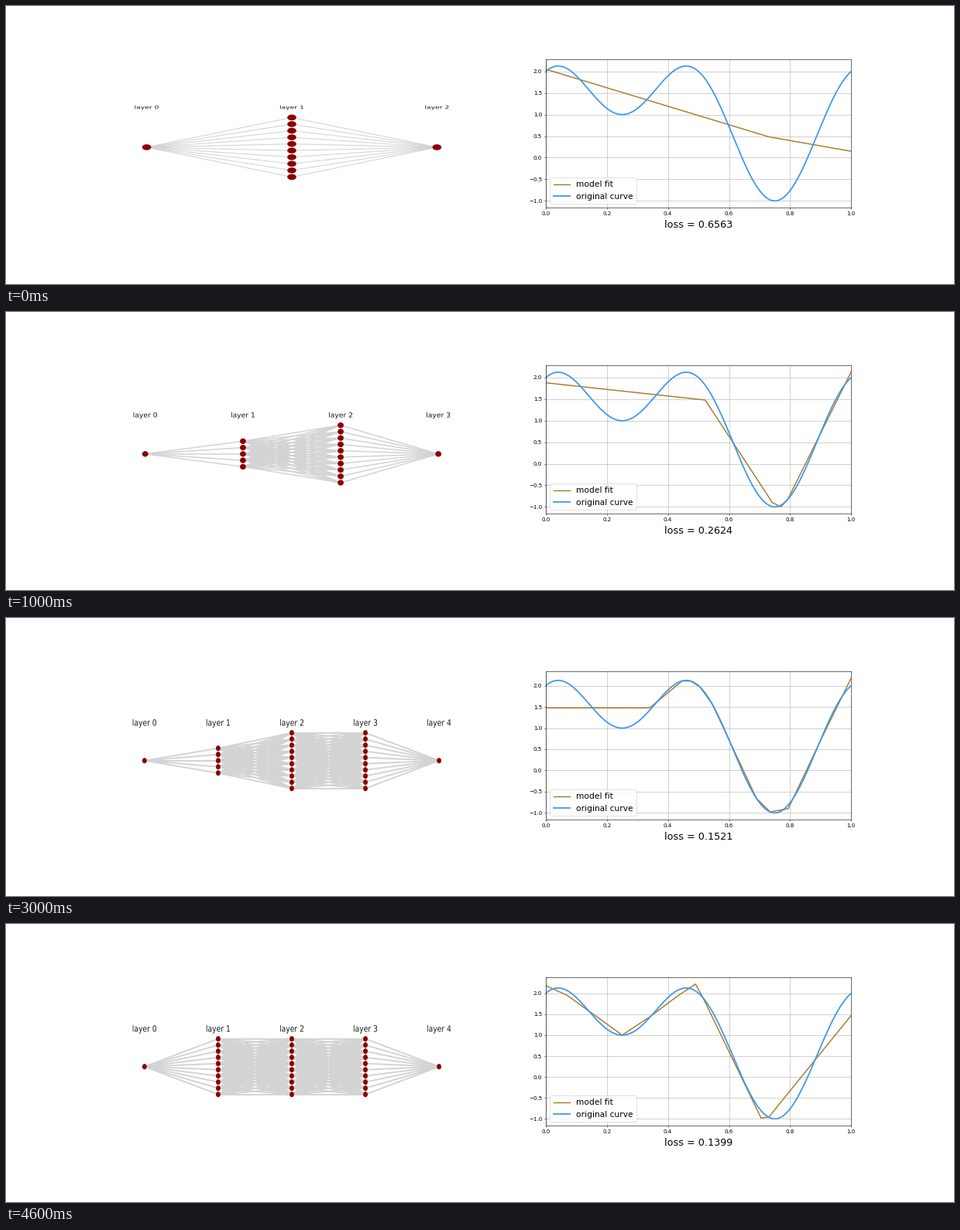
Recreate the animation shown at these times as a matplotlib script. Size 1224 px wide and 360 px high, loop 5000 ms.

```python
import numpy as np
import matplotlib.pyplot as plt
from matplotlib.animation import FuncAnimation
from matplotlib.patches import Ellipse, PathPatch
from matplotlib.textpath import TextPath
from matplotlib.transforms import Affine2D

W, H = 1224, 360
S = 51 / 72  # every point size is scaled to the small stage

plt.rcParams.update({
    "font.family": "DejaVu Sans",
    "font.size": 10 * S,
    "axes.linewidth": 0.8 * S,
    "axes.labelsize": 18 * S,
    "axes.labelpad": 7 * S,
    "grid.linewidth": 0.8 * S,
    "grid.color": "#b0b0b0",
    "patch.linewidth": 1.0 * S,
    "legend.fontsize": 15 * S,
})
for axis in ("xtick", "ytick"):
    plt.rcParams[axis + ".major.size"] = 3.5 * S
    plt.rcParams[axis + ".major.width"] = 0.8 * S
    plt.rcParams[axis + ".major.pad"] = 3.5 * S

FIT, CURVE, NODE, EDGE = "#a87724", "#3f98ee", "darkred", "lightgray"
MID_X = 369
EM = 13 * S
GAP_ROWS = 14.4  # layer gap in row heights before the panel is squeezed

# Hidden layer sizes, loss, corners of the fitted line.
# A corner given as x alone lies on the curve.
STAGES = [
    ([10], 0.6563, [(0, 2.05), (0.73, 0.485), (1, 0.15)]),
    ([5, 10], 0.2624, [(0, 1.88), (0.522, 1.48), (0.742, -0.9),
                       (0.77, -1), 0.792, (1, 2.13)]),
    ([5, 5, 10], 0.2126, [(0, 1.655), 0.543, (0.705, -0.91), 0.75, 0.796,
                          (0.975, 1.91), (1, 1.91)]),
    ([5, 10, 10], 0.1521, [(0, 1.475), (0.34, 1.475), 0.447, 0.475, 0.505,
                           0.545, 0.69, 0.735, (0.794, -0.9), 0.895,
                           (1, 2.18)]),
    ([10, 10, 10], 0.1399, [(0, 2.18), (0.07, 1.95), 0.25, 0.345,
                            (0.425, 1.9), (0.49, 2.22), 0.515,
                            (0.705, -0.98), (0.73, -0.96), (1, 1.47)]),
]


def wave(x):
    return 1 + np.sin(2 * np.pi * x) + np.cos(4 * np.pi * x)


xs = np.linspace(0, 1, 501)
ys = wave(xs)

fig = plt.figure(figsize=(W / 72, H / 72), dpi=72, facecolor="white")
net = fig.add_axes([0, 0, 1, 1])
left, right, top, bottom = 697, 1091.2, 69, 261.1
plot = fig.add_axes([left / W, 1 - bottom / H,
                     (right - left) / W, (bottom - top) / H])
plot.set_xlim(0, 1)
plot.grid(True)
plot.set_axisbelow(True)
fit_line, = plot.plot([], [], color=FIT, lw=2 * S, label="model fit")
plot.plot(xs, ys, color=CURVE, lw=2.5 * S, label="original curve")
plot.legend(loc="lower left")


def label(text, cx, cy, aspect):
    path = TextPath((0, 0), text, size=EM)
    box = path.get_extents()
    place = (Affine2D().translate(-(box.x0 + box.x1) / 2, -0.38 * EM)
             .scale(1, -1 / aspect).translate(cx, cy))
    net.add_patch(PathPatch(place.transform_path(path),
                            fc="#1a1a1a", ec="none"))


def draw_network(sizes):
    net.clear()
    net.axis("off")
    net.set_xlim(0, W)
    net.set_ylim(H, 0)

    # The picture fills a fixed box: width sets the gap, height the rows.
    last = len(sizes) - 1
    gap = 386 / (last + 0.06)
    row = 91.5 / (9.92 + 1.09 * EM * GAP_ROWS / gap)
    aspect = gap / row / GAP_ROWS
    mid = 210.3 - 3.2 * row

    layers = []
    for k, n in enumerate(sizes):
        cx = MID_X + (k - last / 2) * gap
        layers.append([(cx, mid + (j - (n - 1) / 2) * row) for j in range(n)])
        label(f"layer {k}", cx, mid - 4.5 * row - 13.5, aspect)
    for a, b in zip(layers, layers[1:]):
        for p in a:
            for q in b:
                net.plot(*zip(p, q), color=EDGE, lw=1.6 / aspect, zorder=1)
    height = 0.89 * row
    for p in sum(layers, []):
        net.add_patch(Ellipse(p, height * aspect, height,
                              fc=NODE, ec="none", zorder=3))


def draw(i):
    hidden, loss, corners = STAGES[i % len(STAGES)]
    draw_network([1, *hidden, 1])
    fx, fy = zip(*(c if isinstance(c, tuple) else (c, wave(c))
                   for c in corners))
    fit_line.set_data(fx, fy)
    lo, hi = min(ys.min(), *fy), max(ys.max(), *fy)
    pad = 0.05 * (hi - lo)
    plot.set_ylim(lo - pad, hi + pad)
    plot.set_xlabel(f"loss = {loss:.4f}")
    return []


anim = FuncAnimation(fig, draw, frames=len(STAGES), interval=1000,
                     init_func=lambda: draw(0), repeat=True, repeat_delay=0)
plt.show()
```
